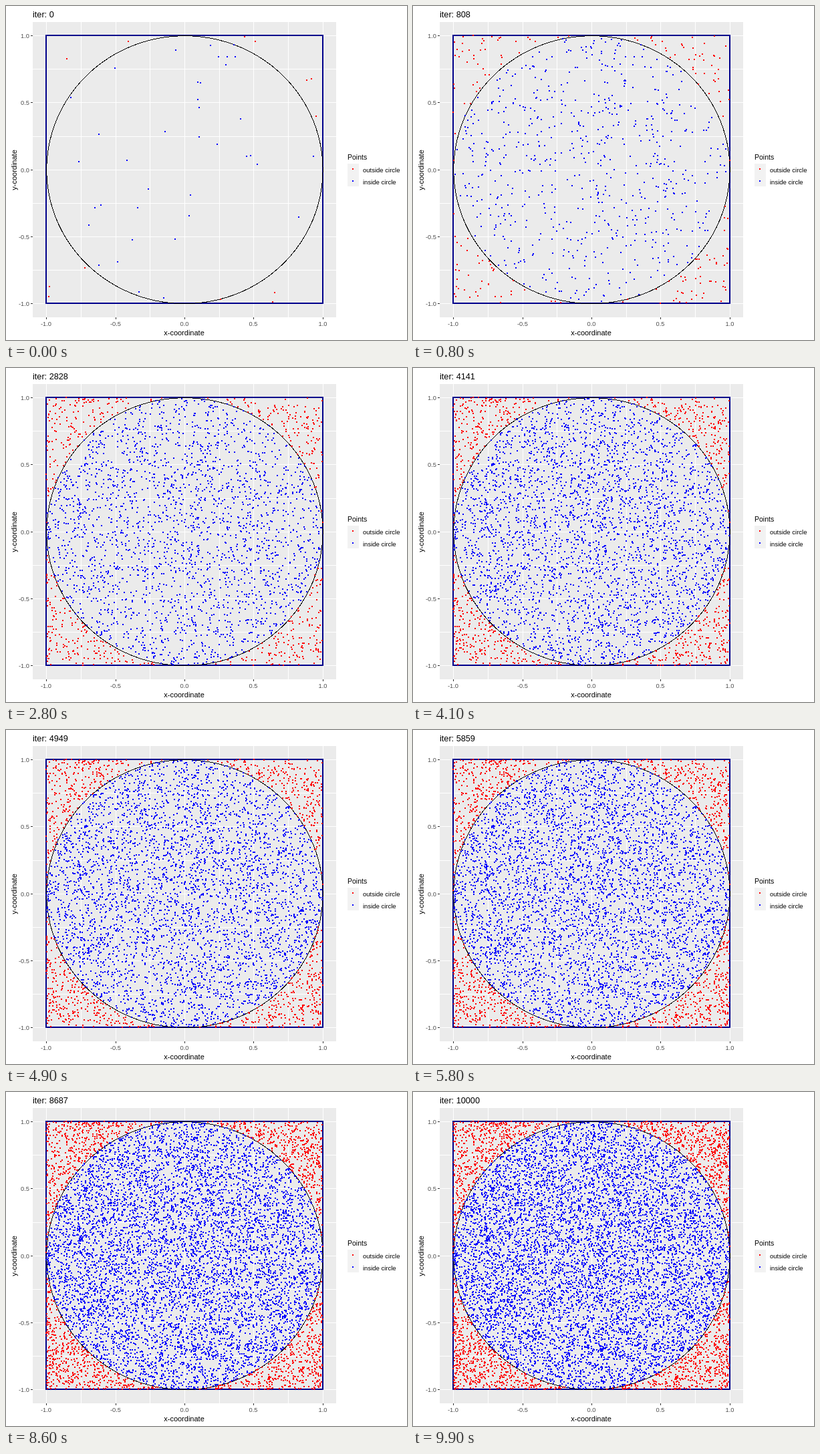
An HTML page with a canvas for the animation above (10000 ms loop, 600 by 500 pixels).

```html
<!DOCTYPE html>
<html lang="en">
<head>
<meta charset="utf-8">
<title>Monte Carlo circle</title>
<style>
  html, body { margin: 0; width: 100%; height: 100%; overflow: hidden; background: #fff; }
  svg, canvas { position: absolute; left: 0; top: 0; width: 600px; height: 500px; }
  text { font-family: "Liberation Sans", Arial, sans-serif; fill: #000; }
  .title { font-size: 12.7px; }
  .axis { font-size: 11px; text-anchor: middle; }
  .tick { font-size: 9.3px; fill: #4d4d4d; }
  .legend { font-size: 10.5px; }
  .key { font-size: 9.5px; }
</style>
</head>
<body>
<svg viewBox="0 0 600 500">
  <g shape-rendering="crispEdges">
    <rect x="40" y="24" width="454" height="442" fill="#ebebeb"/>
    <path id="grid" stroke="#fff"/>
    <path id="ticks" stroke="#333"/>
    <rect x="60" y="44" width="414" height="401" fill="none" stroke="#00008b" stroke-width="2"/>
    <path id="circle" fill="none" stroke="#000"/>
    <rect x="511" y="236" width="17" height="34" fill="#f2f2f2"/>
    <rect x="518" y="243" width="2" height="2" fill="#f00"/>
    <rect x="518" y="261" width="2" height="2" fill="#00f"/>
  </g>
  <g id="labels"></g>
  <text class="title" id="title" x="40" y="17">iter: 0</text>
  <text class="axis" x="266.5" y="493">x-coordinate</text>
  <text class="axis" transform="translate(16 245.5) rotate(-90)">y-coordinate</text>
  <text class="legend" x="511" y="230">Points</text>
  <text class="key" x="534" y="249">outside circle</text>
  <text class="key" x="534" y="267">inside circle</text>
</svg>
<canvas id="dots" width="600" height="500"></canvas>
<script>
const LOOP = 10000, STEP = 100, TOTAL = 10000;
const LAST = LOOP / STEP - 1;
const OPENING = 51; // points already present at iteration 0

const $ = id => document.getElementById(id);
const px = x => 267.45 + 206.7 * x;
const py = y => 245.15 - 200.5 * y;
const crisp = v => Math.floor(v) + 0.5;

function drawAxes() {
  let grid = '', ticks = '', labels = '';
  for (let v = -1; v <= 1; v += 0.25) {
    const x = crisp(px(v)), y = crisp(py(v));
    grid += `M${x} 24v442M40 ${y}h454`;
    if (v % 0.5) continue;
    ticks += `M${x} 466v3M37 ${y}h3`;
    labels += `<text class="tick" x="${x - 0.5}" y="479" text-anchor="middle">${v.toFixed(1)}</text>` +
      `<text class="tick" x="35" y="${y + 3}" text-anchor="end">${v.toFixed(1)}</text>`;
  }
  $('grid').setAttribute('d', grid);
  $('ticks').setAttribute('d', ticks);
  $('labels').innerHTML = labels;
}

function drawCircle() {
  const corners = Array.from({ length: 100 }, (_, i) => {
    const a = i * 2 * Math.PI / 99;
    return `${px(Math.cos(a))} ${py(Math.sin(a))}`;
  });
  $('circle').setAttribute('d', 'M' + corners.join('L'));
}

function seeded(a) {
  return () => {
    a = a + 0x6D2B79F5 | 0;
    let t = Math.imul(a ^ a >>> 15, 1 | a);
    t = t + Math.imul(t ^ t >>> 7, 61 | t) ^ t;
    return ((t ^ t >>> 14) >>> 0) / 4294967296;
  };
}

const rand = seeded(7);
const points = Array.from({ length: TOTAL }, () => ({ x: rand() * 2 - 1, y: rand() * 2 - 1 }));

const ctx = $('dots').getContext('2d');
let drawn = 0, shownStep = -1;

function drawPoint({ x, y }) {
  ctx.fillStyle = Math.hypot(x, y) > 1 ? '#f00' : '#00f';
  ctx.fillRect(Math.floor(px(x)) - 1, Math.floor(py(y)) - 1, 2, 2);
}

function show(step) {
  const iter = Math.round(step * TOTAL / LAST);
  const count = Math.min(TOTAL, iter + OPENING);
  if (count < drawn) {
    ctx.clearRect(0, 0, 600, 500);
    drawn = 0;
  }
  while (drawn < count) drawPoint(points[drawn++]);
  $('title').textContent = 'iter: ' + iter;
  shownStep = step;
}

const start = performance.now();
function tick() {
  const step = Math.floor((performance.now() - start) % LOOP / STEP);
  if (step !== shownStep) show(step);
  requestAnimationFrame(tick);
}

drawAxes();
drawCircle();
tick();
</script>
</body>
</html>
```
